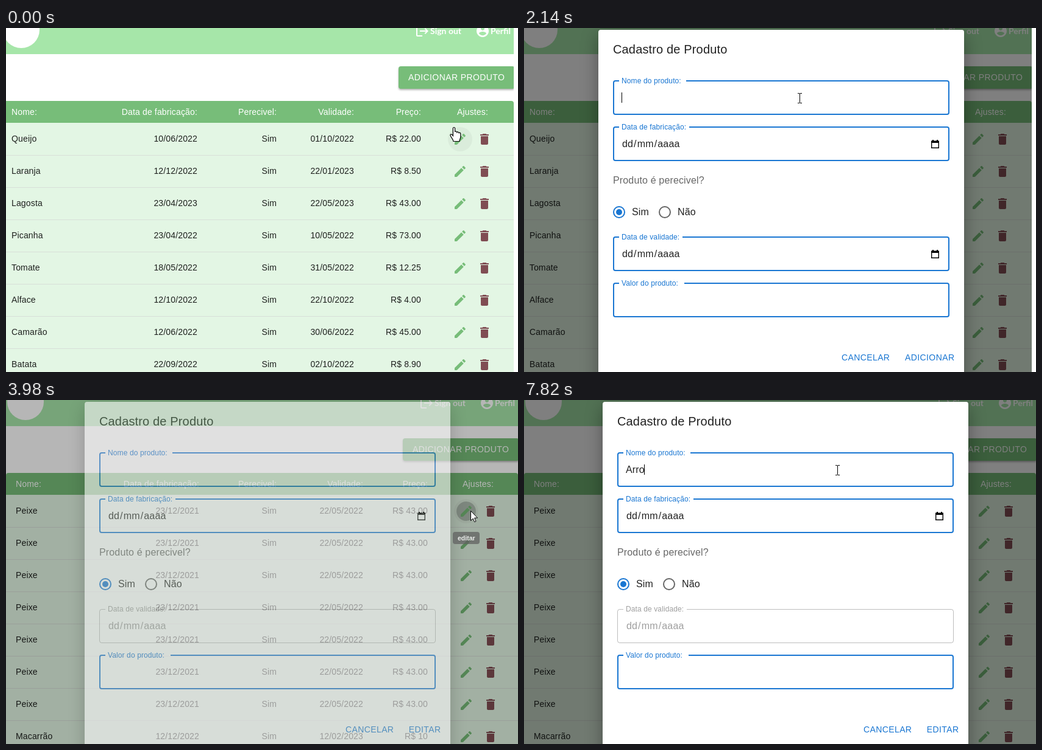
An HTML page for the animation above (8 s loop, 840x566 px).

```html
<!DOCTYPE html>
<html lang="pt-BR">
<head>
<meta charset="utf-8">
<title>Cadastro de Produto</title>
<style>
  html, body { margin: 0; width: 100%; height: 100%; overflow: hidden; background: #fff; }
  svg { display: block; }
  text { font: 14px "Liberation Sans", Arial, sans-serif; letter-spacing: .15px; fill: #000; fill-opacity: .87; white-space: pre; }
  .white { fill: #fff; fill-opacity: 1; }
  .nav { font: 700 14px Lato, sans-serif; letter-spacing: 0; }
  .caps { letter-spacing: .4px; }
  .blue { fill: #1976d2; fill-opacity: 1; }
  .title { font-size: 20px; }
  .label { font-size: 12px; letter-spacing: .11px; }
  .input { font-size: 16px; }
  .muted { fill-opacity: .6; }
  .off { fill: #000; fill-opacity: .38; }
  .end { text-anchor: end; }
  .tip { font-size: 10.5px; font-weight: 700; letter-spacing: 0; }
  .record { font: 11px "Open Sans", sans-serif; letter-spacing: 0; fill: #777; }
  .raised { filter: drop-shadow(0 2px 1.5px rgba(0,0,0,.3)); }
  .paper { filter: drop-shadow(0 9px 14px rgba(0,0,0,.35)); }
</style>
</head>
<body>
<svg id="stage" width="840" height="566" viewBox="0 0 840 566"></svg>
<script>
const GREEN = '#77bd79', BLUE = '#1976d2';
const LOOP = 8000, SECOND_SCENE = 2470;
const ICONS = {
  edit: 'M3 17.25V21h3.75L17.81 9.94l-3.75-3.75L3 17.25zM20.71 7.04c.39-.39.39-1.02 0-1.41l-2.34-2.34c-.39-.39-1.02-.39-1.41 0l-1.83 1.83 3.75 3.75 1.83-1.83z',
  trash: 'M6 19c0 1.1.9 2 2 2h8c1.1 0 2-.9 2-2V7H6v12zM19 4h-3.5l-1-1h-5l-1 1H5v2h14V4z',
  logout: 'm17 7-1.41 1.41L18.17 11H8v2h10.17l-2.58 2.58L17 17l5-5zM4 5h8V3H4c-1.1 0-2 .9-2 2v14c0 1.1.9 2 2 2h8v-2H4V5z',
  account: 'M12 2C6.48 2 2 6.48 2 12s4.48 10 10 10 10-4.48 10-10S17.52 2 12 2zm0 3c1.66 0 3 1.34 3 3s-1.34 3-3 3-3-1.34-3-3 1.34-3 3-3zm0 14.2c-2.5 0-4.71-1.28-6-3.22.03-1.99 4-3.08 6-3.08 1.99 0 5.97 1.09 6 3.08-1.29 1.94-3.5 3.22-6 3.22z'
};

const text = (x, y, cls, s) => `<text x="${x}" y="${y}" class="${cls}">${s}</text>`;
const rect = (x, y, w, h, attrs) => `<rect x="${x}" y="${y}" width="${w}" height="${h}" ${attrs}/>`;
const circle = (x, y, r, attrs) => `<circle cx="${x}" cy="${y}" r="${r}" ${attrs}/>`;
const icon = (name, x, y, fill) => `<path d="${ICONS[name]}" transform="translate(${x} ${y})" fill="${fill}"/>`;

function table({ cols, editX, rows }) {
  const cells = (values, y, cls) => values.map((v, i) =>
    i ? text(cols[i - 1], y, cls + ' end', v) : text(16, y, cls, v)).join('');
  const heads = ['Nome:', 'Data de fabricação:', 'Perecivel:', 'Validade:', 'Preço:', 'Ajustes:'];
  return rect(0, 120, 840, 46, `rx="4" fill="${GREEN}"`) + rect(0, 156, 840, 410, 'fill="#e3f6e4"')
    + cells(heads, 143, 'white')
    + circle(editX + 12, 183, 20, 'class="hover" fill-opacity=".04"')
    + circle(editX + 12, 183, 0, 'class="press" fill-opacity=".2"')
    + rows.map((row, i) => {
        const y = 156 + 53 * i;
        return cells(row, y + 31, '') + icon('edit', editX, y + 15, GREEN)
          + icon('trash', editX + 40, y + 15, '#804d53')
          + rect(0, y + 53, 840, 1, 'fill="#d8dfd8"');
      }).join('');
}

function field(y, label, gapEnd, enabled, isDate) {
  const off = enabled ? '' : ' off';
  const frame = enabled
    ? rect(154, y + 1, 550, 55, `rx="3" fill="none" stroke="${BLUE}" stroke-width="2"`)
    : rect(153.5, y + 1.5, 551, 55, 'rx="3.5" fill="none" stroke="#000" stroke-opacity=".26"');
  const date = text(168, y + 34, 'input' + off,
    ['dd', '/', 'mm', '/', 'aaaa'].map((s, i) => `<tspan dx="${i ? 1 : 0}">${s}</tspan>`).join(''));
  const calendar = `<path transform="translate(675 ${y + 22})" d="M2 0h2v1.5h5V0h2v1.5h2V14H0V1.5h2zM1.4 5v7.6h10.2V5z" fill-rule="evenodd"/>`;
  return frame + rect(163, y - 1, gapEnd - 163, 4, 'fill="#fff"')
    + text(167, y + 5, 'label ' + (enabled ? 'blue' : 'off'), label)
    + (isDate ? date + (enabled ? calendar : '') : '');
}

function dialog({ action, cancelEnd, expiryEnabled }) {
  return `<rect class="backdrop" width="840" height="566"/><g class="dialog">`
    + rect(129, 3, 600, 620, 'rx="4" fill="#fff" class="paper"')
    + text(153, 42, 'title', 'Cadastro de Produto')
    + field(86, 'Nome do produto:', 273, true)
    + field(162, 'Data de fabricação:', 278, true, true)
    + text(153, 256, 'input muted', 'Produto é perecivel?')
    + circle(163, 303, 9, `fill="none" stroke="${BLUE}" stroke-width="2"`) + circle(163, 303, 5, `fill="${BLUE}"`)
    + text(184, 308, 'input', 'Sim')
    + circle(238, 303, 9, 'fill="none" stroke="#666" stroke-width="2"')
    + text(259, 308, 'input', 'Não')
    + field(343, 'Data de validade:', 267, expiryEnabled, true)
    + field(419, 'Valor do produto:', 270, true)
    + text(cancelEnd, 547, 'caps blue end', 'CANCELAR')
    + text(713.4, 547, 'caps blue end', action)
    + text(167, 120, 'input typed', '') + rect(167, 106, 1, 17, 'class="caret"')
    + '</g>';
}

const page = (id, dx, options) => `<svg id="${id}" x="${dx}" width="840" height="566">`
  + rect(0, 0, 840, 566, 'fill="#fff"') + rect(0, 0, 840, 43, 'fill="#a6e6a9"')
  + circle(32, 3, 30, 'fill="#fff"')
  + icon('logout', 678, -7, '#fff') + text(703, 10, 'nav white', 'Sign out')
  + icon('account', 777, -7, '#fff') + text(802, 10, 'nav white', 'Perfil')
  + `<clipPath id="${id}-button">` + rect(651, 63, 190.5, 37, 'rx="4"') + '</clipPath>'
  + rect(651, 63, 190.5, 37, 'rx="4" class="raised button"')
  + `<g clip-path="url(#${id}-button)">` + circle(727, 92, 0, 'class="ripple" fill="#fff"') + '</g>'
  + text(667, 86, 'caps white', 'ADICIONAR PRODUTO')
  + table(options) + dialog(options) + '</svg>';

const productRows = [
  ['Queijo', '10/06/2022', '01/10/2022', '22.00'], ['Laranja', '12/12/2022', '22/01/2023', '8.50'],
  ['Lagosta', '23/04/2023', '22/05/2023', '43.00'], ['Picanha', '23/04/2022', '10/05/2022', '73.00'],
  ['Tomate', '18/05/2022', '31/05/2022', '12.25'], ['Alface', '12/10/2022', '22/10/2022', '4.00'],
  ['Camarão', '12/06/2022', '30/06/2022', '45.00'], ['Batata', '22/09/2022', '02/10/2022', '8.90']
];
const fishRows = [...Array(7).fill(['Peixe', '23/12/2021', '22/05/2022', '43.00']),
  ['Macarrão', '12/12/2022', '12/02/2023', '10']];
const toCells = rows => rows.map(([name, made, expiry, price]) => [name, made, 'Sim', expiry, 'R$ ' + price]);

const stage = document.getElementById('stage');
stage.innerHTML =
  page('add', -7, { cols: [321, 451, 578, 688, 798], editX: 740, rows: toCells(productRows),
    action: 'ADICIONAR', cancelEnd: 607.4, expiryEnabled: true })
  + page('edit', 0, { cols: [317, 444, 586, 692, 800], editX: 743, rows: toCells(fishRows),
    action: 'EDITAR', cancelEnd: 636.4, expiryEnabled: false })
  + '<g id="tooltip">' + rect(733, 217, 44, 20, 'rx="4" fill="#616161" fill-opacity=".92"')
  + text(741, 231, 'tip white', 'editar') + '</g>'
  + '<g id="record">' + rect(793.5, 545.5, 45, 22, 'fill="#fff" fill-opacity=".65" stroke="#aaa"')
  + text(799, 565, 'record', 'Gravar') + '</g>'
  + `<g id="cursor">
      <path class="arrow" d="M.5.5V16.5L4.2 13 6.6 18.6 9 17.6 6.6 12H11.6Z" fill="#fff" stroke="#000"/>
      <path class="hand" d="M-1.6 2C-1.6 0 1.6 0 1.6 2V8C2 6.6 4.5 6.6 4.8 8.6 5.4 7.5 7.6 7.8 7.9 9.6 9 8.7 10.8 9.3 10.8 11V16C10.8 19 9 20 9 23.5H-1C-1 20.5-5 17-6 13.6-6.3 11.4-4 11-1.6 14.4Z" fill="#fff" stroke="#000" stroke-width="1.2"/>
      <path class="beam" d="M-3-7.5H-1L.5-7 2-7.5H4M.5-7V7.5M-3 8.5H-1L.5 8 2 8.5H4" fill="none" stroke="#000"/>
    </g>`;

const clamp = v => Math.min(1, Math.max(0, v));
const ramp = (t, from, to) => clamp((t - from) / (to - from));
const pulse = (t, inFrom, inTo, outFrom, outTo) => ramp(t, inFrom, inTo) * (1 - ramp(t, outFrom, outTo));
const within = (t, from, to) => t >= from && t < to;

// cubic-bezier(.4, 0, .2, 1)
function ease(x) {
  let lo = 0, hi = 1;
  for (let i = 0; i < 16; i++) {
    const s = (lo + hi) / 2;
    const bx = 1.2 * s * (1 - s) ** 2 + .6 * s * s * (1 - s) + s ** 3;
    if (bx < x) lo = s; else hi = s;
  }
  return lo * lo * (3 - 2 * lo);
}

const cursorPath = [
  [0, 735, 163], [80, 735, 160], [480, 724, 96], [650, 720, 91], [1060, 720, 91],
  [1670, 620, 132], [2070, 452, 115], [2469, 452, 115],
  [2600, 812, 556], [3200, 768, 184], [3420, 762, 182], [3985, 762, 182],
  [4600, 615, 142], [4810, 514, 115], [LOOP, 514, 115]
];
const typing = [[0, ''], [6360, 'A'], [6960, 'Ar'], [7160, 'Arr'], [7820, 'Arro']];
const caretOn = [[2140, 2470], [5080, 5610], [6090, 6890], [6960, 7690], [7820, LOOP]];

function cursorAt(t) {
  const i = Math.max(1, cursorPath.findIndex(k => k[0] > t));
  const [a, b] = [cursorPath[i - 1], cursorPath[i]];
  const u = ramp(t, a[0], b[0]), k = u * u * (3 - 2 * u);
  return [a[1] + (b[1] - a[1]) * k, a[2] + (b[2] - a[2]) * k];
}

function cursorKind(x, y, open, editX) {
  if (open) return x > 153 && x < 705 && (within(y, 86, 143) || within(y, 162, 219)) ? 'beam' : 'arrow';
  const onButton = x > 651 && within(y, 63, 100);
  return onButton || Math.hypot(x - editX - 12, y - 183) < 23 ? 'hand' : 'arrow';
}

const byId = id => document.getElementById(id);
const show = (el, visible) => { el.style.display = visible ? '' : 'none'; };

function draw(t) {
  const first = t < SECOND_SCENE;
  show(byId('add'), first);
  show(byId('edit'), !first);
  const scene = byId(first ? 'add' : 'edit');
  const part = name => scene.querySelector('.' + name);
  const openAt = first ? 850 : 3895;
  const open = t >= openAt;

  const fade = ease(ramp(t, openAt, openAt + 225));
  part('backdrop').setAttribute('opacity', fade * .5);
  part('dialog').setAttribute('opacity', fade);

  const dark = first ? ease(ramp(t, 430, 680)) * (1 - ease(ramp(t, 900, 1130))) : 0;
  const mix = (a, b) => Math.round(a + (b - a) * dark);
  part('button').setAttribute('fill', `rgb(${mix(119, 27)},${mix(189, 94)},${mix(121, 32)})`);
  part('ripple').setAttribute('r', first ? 170 * ease(ramp(t, 700, 1250)) : 0);
  part('ripple').setAttribute('opacity', .3 * (1 - ramp(t, 920, 1080)));

  part('hover').setAttribute('opacity', first ? 1 - ramp(t, 80, 230) : pulse(t, 3150, 3300, 3960, 4110));
  part('press').setAttribute('r', first ? 0 : 20 * ease(ramp(t, 3800, 4150)));
  part('press').setAttribute('opacity', 1 - ramp(t, 4000, 4300));

  const typed = typing.filter(([at]) => at <= t).pop()[1];
  part('typed').textContent = typed;
  const typedWidth = typed ? part('typed').getComputedTextLength() : 0;
  part('caret').setAttribute('x', Math.floor(167 + typedWidth));
  show(part('caret'), caretOn.some(([from, to]) => within(t, from, to)));

  byId('tooltip').setAttribute('opacity', pulse(t, 3270, 3450, 3950, 4110));
  byId('record').setAttribute('opacity', first ? 0 : 1 - ramp(t, 2470, 2690));

  const [x, y] = cursorAt(t);
  const kind = cursorKind(first ? x + 7 : x, y, open, first ? 740 : 743);
  byId('cursor').setAttribute('transform', `translate(${Math.round(x)} ${Math.round(y)})`);
  show(byId('cursor'), !within(t, SECOND_SCENE, 2600));
  for (const shape of byId('cursor').children) show(shape, shape.classList.contains(kind));
}

const start = performance.now();
function frame() {
  draw((performance.now() - start) % LOOP);
  requestAnimationFrame(frame);
}
frame();
</script>
</body>
</html>
```
